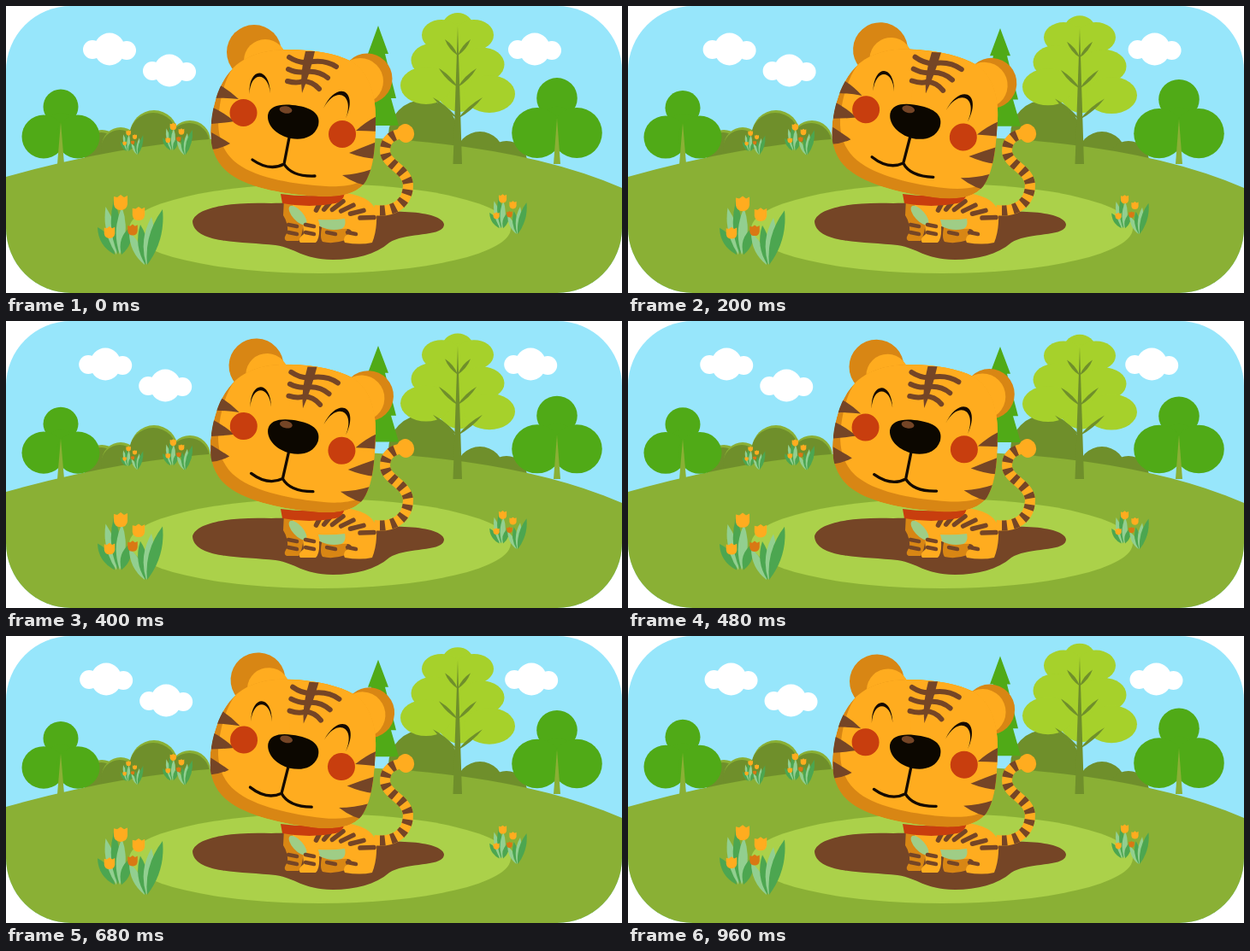
These frames come from a looping animation (720 px wide and 336 px high, 1000 ms). An HTML page:

```html
<!DOCTYPE html>
<html lang="en">
<head>
<meta charset="utf-8">
<title>Tiger in the meadow</title>
<style>
  html, body { margin: 0; width: 100%; height: 100%; overflow: hidden; background: #fff; }
  svg { display: block; width: 100%; height: 100%; }
</style>
</head>
<body>
<svg id="stage" viewBox="0 0 720 336"></svg>
<script>
const C = {
  sky: '#97e6fb', hill: '#8ab035', lawn: '#abd14a', mud: '#754526', bush: '#6f8f2b',
  tree: '#50aa17', lime: '#a6d12b', fur: '#ffac1f', shade: '#d88614', red: '#c83e0e',
  belly: '#9fcd86', ink: '#140a02', leaf: '#4ca650', pale: '#92cf90'
};

const loop = (n, f) => Array.from({ length: n }, (_, i) => f(i)).join('');
const sides = f => f(-1) + f(1);
const path = (d, fill) => `<path d="${d}" fill="${fill}"/>`;
const line = (d, color, w, extra = 'stroke-linecap="round"') =>
  `<path d="${d}" fill="none" stroke="${color}" stroke-width="${w}" ${extra}/>`;
const oval = (x, y, rx, ry, fill, turn = 0) =>
  `<ellipse cx="${x}" cy="${y}" rx="${rx}" ry="${ry}" fill="${fill}" transform="rotate(${turn} ${x} ${y})"/>`;
const ball = (x, y, r, fill) => oval(x, y, r, r, fill);
const sway = (base, art) => `<g class="sway" data-base="${base}">${art}</g>`;

// pointed lens between two points, w across the middle
function blade(x1, y1, x2, y2, w, fill) {
  const k = w / Math.hypot(x2 - x1, y2 - y1);
  const mx = (x1 + x2) / 2, my = (y1 + y2) / 2;
  const nx = (y1 - y2) * k, ny = (x2 - x1) * k;
  return path(`M${x1} ${y1}Q${mx + nx} ${my + ny} ${x2} ${y2}Q${mx - nx} ${my - ny} ${x1} ${y1}`, fill);
}

// closed happy eye: a crescent standing on the chord between two points
function eye(x1, y1, x2, y2) {
  const dx = x2 - x1, dy = y2 - y1;
  const at = (x, y, h) => `${x + dy * h} ${y - dx * h}`;
  return path(`M${x1} ${y1}C${at(x1, y1, 1.3)} ${at(x2, y2, 1.3)} ${x2} ${y2}` +
    `C${at(x2 - 2, y2, 1.08)} ${at(x1 + 2, y1, 1.08)} ${x1} ${y1}`, C.ink);
}

const cloud = (x, y) => `<g transform="translate(${x} ${y})">` +
  ball(11, 20, 11, '#fff') + oval(31, 19.5, 18, 19, '#fff') + ball(51, 21, 11, '#fff') + '</g>';

const tulip = (x, y, s, fill) => `<g transform="translate(${x} ${y}) scale(${s})">` +
  path('M-8 -7L-4 -6L0 -9L4 -6L8 -8V2Q7 9 0 9Q-7 9 -8 2Z', fill) + '</g>';

const flowerArt =
  loop(5, i => blade(22 + 2 * i, 74, 2 + 9.5 * i, 10 + 8 * (i - 2) ** 2, 11, i % 2 ? C.pale : C.leaf)) +
  loop(4, i => blade(57 + i, 86, 39 + 13 * i, 48 - 9 * i, 10 + i, i % 2 ? C.leaf : C.pale)) +
  tulip(29, 13, 1, C.fur) + tulip(50, 26, .9, C.fur) +
  tulip(16, 48, .78, C.fur) + tulip(43, 45, .72, '#d97814');
const flowers = (x, y, s) =>
  sway(y + 86 * s, `<g transform="translate(${x} ${y}) scale(${s})">${flowerArt}</g>`);

const bush = (x, y, r) => ball(x, y, r, C.hill) + ball(x - 1, y + 3, r, C.bush);
const bushes = bush(112, 166, 21) + bush(134, 164, 22) + bush(173, 150, 28) + bush(215, 158, 24) +
  ball(488, 151, 41, C.bush) + ball(554, 175, 28, C.bush) + ball(585, 182, 24, C.bush);

const pine = sway(184, path(
  'M435 23L447 56H443L456 108H450L459 140H411L420 108H414L427 56H423Z', C.tree));

const limeTree = sway(184,
  oval(528, 24, 18, 16, C.lime) + oval(530, 72, 34, 52, C.lime) +
  loop(3, i => sides(s => oval(528 + s * (19 + 9 * i), 34 + 32 * i + 2.5 * i * s,
    23 + 3.5 * i, 18 + 2 * i, C.lime))) +
  path('M528 24L533 185H522.5Z', C.bush) +
  loop(3, i => sides(s => blade(528, 58 + 37 * i, 528 + s * (15 + 7 * i), 39 + 34 * i, 4, C.bush))));

const roundTree = (x, y, s) => sway(184,
  ball(x, y - 35 * s, 20.5 * s, C.tree) + ball(x, y - 8, 20 * s, C.tree) +
  sides(k => ball(x + k * 20 * s, y, 25.5 * s, C.tree)) +
  path(`M${x} ${y - 17}L${x + 4} 185H${x - 4}Z`, C.hill));

const tailPath = 'M430 239C452 242 470 232 470 209C468 190 444 186 443 170C443 156 452 150 466 149';
const tail = line(tailPath, C.fur, 12, '') +
  line(tailPath, C.mud, 12, 'stroke-dasharray="6 7" stroke-dashoffset="-7"') +
  oval(467, 149, 10, 11, C.fur, -20);

// stripes turn from upright at the neck to level at the rump
function backStripe(i) {
  const a = (118 + 12 * i) * Math.PI / 180, x = 370 + 12 * i, y = 225 + .9 * i * i;
  return line(`M${x} ${y}l${16 * Math.cos(a)} ${16 * Math.sin(a)}`, C.mud, 5.5);
}
const legStripe = (x, y) => line(`M${x - 5} ${y}l10 2`, C.mud, 4.5);

const body =
  path('M325 225L324 245Q330 254 329 265Q323 273 328 275H342Q347 268 348 250L370 255Q366 271 370 276Q382 279 397 274L402 235Z', C.shade) +
  path('M335 226Q333 245 347 256L348 267Q340 273 344 277H362Q367 272 366 258L394 261Q402 260 404 264Q392 270 396 277Q414 280 428 277Q434 262 433 243Q430 224 398 219Z', C.fur) +
  oval(341, 245, 14, 6, C.belly, 48) +
  path('M365 250Q382 251 396 249Q398 258 392 261Q379 264 367 258Z', C.belly) +
  loop(6, backStripe) +
  loop(2, i => legStripe(335, 256 + 9 * i) + legStripe(355, 256 + 9 * i) + legStripe(380 + 24 * i, 265)) +
  path('M321 220Q355 225 396 219Q394 229 385 231Q355 237 323 231Z', C.red);

const skull = 'M266 72C285 54 310 51 330 51C360 51 386 56 402 64C425 76 432 105 432 130C432 165 430 190 420 206C409 222 385 224 365 223C330 221 285 214 262 197C241 182 237 158 240 135C243 110 250 88 266 72Z';
const spike = (x, y, tipX, tipY) =>
  path(`M${x} ${y - 11}Q${(x + tipX) / 2} ${y - 5} ${tipX} ${tipY}Q${(x + tipX) / 2} ${y + 8} ${x} ${y + 9}Z`, C.mud);

const face =
  ball(290, 54, 32, C.shade) + ball(303, 64, 25, C.fur) +
  ball(422, 85, 29.5, C.shade) + ball(414, 88, 27, C.fur) +
  `<clipPath id="skull"><path d="${skull}"/></clipPath><g clip-path="url(#skull)">` +
  path(skull, C.shade) +
  `<g transform="translate(9 -12)">${path(skull, C.fur)}</g>` +
  path('M330 40H440V150H330Z', C.fur) +
  loop(3, i => spike(240, 99 + 30 * i, 272 - 5 * i, 109 + 26 * i) +
    spike(438 - 5 * i, 138 + 32 * i, 409 - 8 * i, 146 + 26 * i)) + '</g>' +
  path('M350 53H361Q355 80 346 102Q343 80 350 53Z', C.mud) +
  loop(3, i => line(`M${331 - i} ${60 + 14 * i}Q${342 - i} ${67 + 12 * i} ${353 - 3 * i} ${66 + 11 * i}` +
    `Q${372 - 7 * i} ${62 + 13 * i} ${386 - 10 * i} ${71 + 13 * i}`, C.mud, 6)) +
  ball(277.5, 125, 16, C.red) + ball(393, 150, 16, C.red) +
  eye(284.5, 103, 309, 102) + eye(371, 120, 397, 132) +
  line('M331 154L325 185M288 180Q308 194 325 185Q334 200 361 199', C.ink, 3.3) +
  path('M306 128C308 115 325 114 342 117C360 120 368 128 365 140C360 155 345 157 333 155C318 152 305 141 306 128Z', '#0c0700') +
  oval(327, 121.5, 7.5, 4.2, C.mud, 10);

const stage = document.getElementById('stage');
stage.innerHTML =
  '<clipPath id="card"><rect width="720" height="336" rx="76"/></clipPath><g clip-path="url(#card)">' +
  `<rect width="720" height="336" fill="${C.sky}"/>` +
  `<g id="clouds">${cloud(90, 31) + cloud(160, 56) + cloud(587, 31)}</g>` +
  bushes + pine +
  path('M0 200Q170 152 330 152Q580 152 720 213V336H0Z', C.hill) +
  limeTree + roundTree(64, 153, 1) + roundTree(644, 148.5, 1.16) +
  oval(367, 260.5, 223, 52.5, C.lawn) +
  path('M218 252C222 236 262 229 310 231C345 229 400 232 430 242C470 238 511 243 512 256C511 271 468 264 448 277C432 291 408 297 382 297C345 296 340 284 315 280C275 276 219 278 218 252Z', C.mud) +
  flowers(133, 144, .35) + flowers(182, 135, .46) + flowers(564, 218, .57) + flowers(105, 217, 1) +
  tail + body + `<g id="head">${face}</g></g>`;

const clouds = document.getElementById('clouds');
const head = document.getElementById('head');
const plants = [...document.querySelectorAll('.sway')];

// 0 to 1 and back over one period
const swing = (t, period) => 1 - Math.abs(1 - 2 * (t % period) / period);

function draw(now) {
  const t = Math.floor(now % 1000 / 40) * 40;
  const slow = swing(t, 1000), quick = swing(t, 500);
  clouds.setAttribute('transform', `translate(${-6 * slow} 0)`);
  head.setAttribute('transform', `rotate(${4.5 * quick} 338 133)`);
  const s = 1 - .046 * slow;
  for (const p of plants)
    p.setAttribute('transform', `matrix(1 0 0 ${s} 0 ${p.dataset.base * (1 - s)})`);
}

const start = performance.now();
function tick() {
  draw(performance.now() - start);
  requestAnimationFrame(tick);
}
tick();
</script>
</body>
</html>
```
